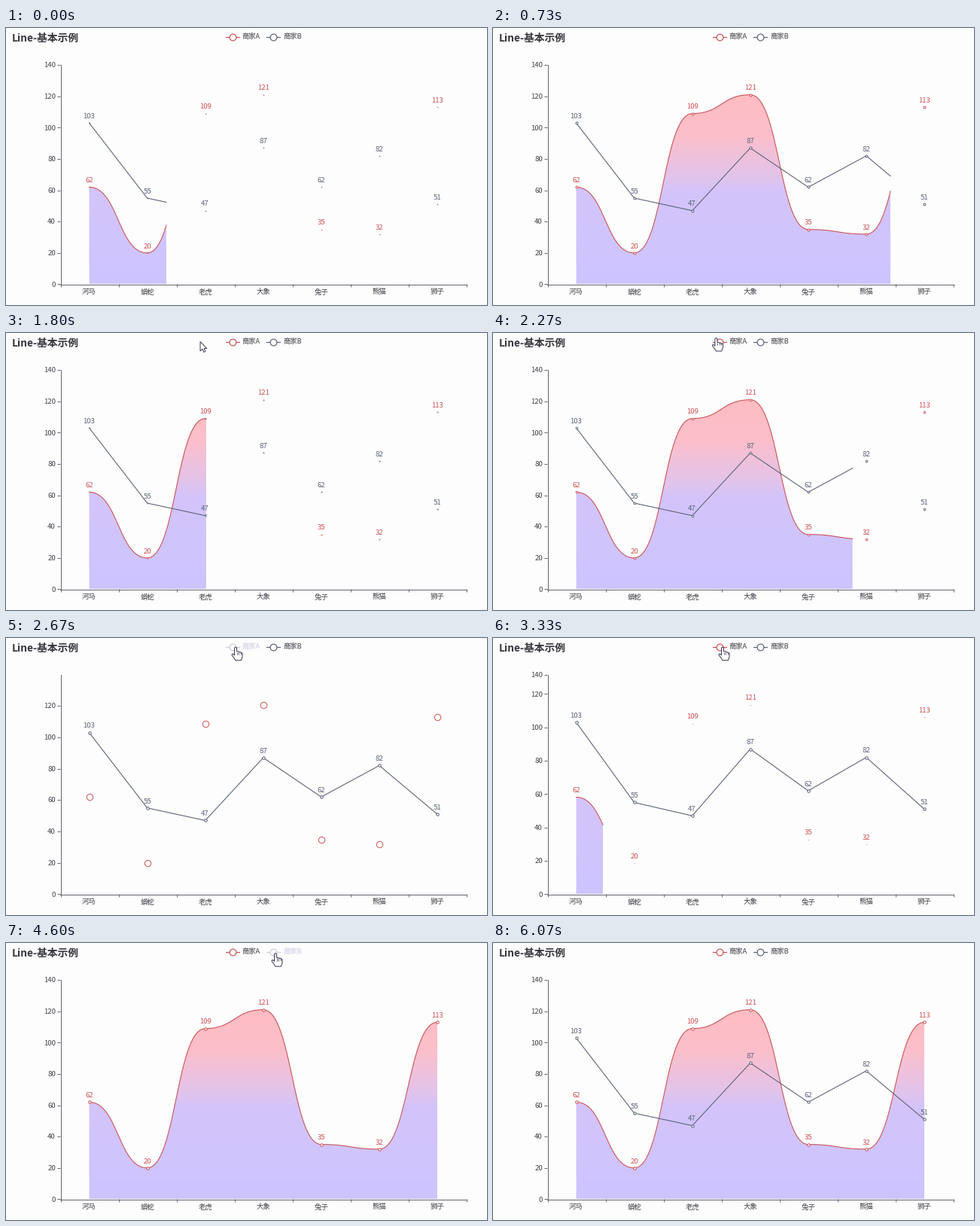
Write a matplotlib script that moves like this. It is 639 by 368 pixels and loops after 6140 ms.

```python
import numpy as np
import matplotlib.pyplot as plt
from matplotlib.animation import FuncAnimation
from matplotlib.collections import LineCollection
from matplotlib.colors import LinearSegmentedColormap
from matplotlib.patches import Polygon
from matplotlib.path import Path

W, H = 639, 368
LOOP, INTERVAL = 6140, 20
POSES = 92  # the picture itself moves at 15 poses a second
FONT = "Noto Sans CJK JP"
LEFT, RIGHT, TOP, BASE = 72, 611.5, 49.2, 340.4
BAND = (RIGHT - LEFT) / 7

RED, SLATE = "#cb5457", "#5d6478"
INK, AXIS, FADED, BG = "#42424a", "#666874", "#cfcbe0", "#fdfdfe"

ANIMALS = ["河马", "蟒蛇", "老虎", "大象", "兔子", "熊猫", "狮子"]
SHOP_A = np.array([62, 20, 109, 121, 35, 32, 113])
SHOP_B = np.array([103, 55, 47, 87, 62, 82, 51])
XS = LEFT + BAND * (np.arange(7) + 0.5)

# Timeline in ms
REVEAL, UPDATE, SHRINK = 2000, 360, 200
FIRST, RESTART = -192, 1526
HIDE_A, SHOW_A = 2668, 3241
HIDE_B, SHOW_B = 4350, 4870
CURSOR_T = [1735, 1800, 2070, 2200, 2340, 3780, 4010, 5480, 6010]
CURSOR_X = [246, 258, 262, 288, 305, 305, 358, 358, 595]
CURSOR_Y = [30, 11.5, 12, 1, 12, 12, 13.5, 13.5, 60]


def ease_out(p):
    return 1 - (1 - np.clip(p, 0, 1)) ** 3


def to_y(values, top=140):
    return BASE - np.asarray(values) * (BASE - TOP) / top


def smooth(xs, ys, n=60):
    """Join the points with S-curves that are level at each point."""
    t = np.linspace(0, 1, n)
    across, along = 1.5 * t * (1 - t) + t ** 3, 3 * t ** 2 - 2 * t ** 3
    px = [x0 + (x1 - x0) * across for x0, x1 in zip(xs, xs[1:])]
    py = [y0 + (y1 - y0) * along for y0, y1 in zip(ys, ys[1:])]
    return np.concatenate(px), np.concatenate(py)


def cut(xs, ys, limit):
    """Keep the part of a curve left of the limit."""
    if limit <= xs[0]:
        return xs[:0], ys[:0]
    if limit >= xs[-1]:
        return xs, ys
    keep = xs < limit
    return np.append(xs[keep], limit), np.append(ys[keep], np.interp(limit, xs, ys))


fig = plt.figure(figsize=(W / 72, H / 72), dpi=72, facecolor=BG)
ax = fig.add_axes([0, 0, 1, 1])
ax.axis("off")


def write(x, y, text, color=INK, size=9.6, ha="center", **kw):
    return ax.text(x, y + 0.37 * size, text, color=color, fontsize=size, ha=ha,
                   va="baseline", family=FONT, **kw)


def move_text(item, y):
    item.set_y(y + 0.37 * item.get_fontsize())


class Series:
    def __init__(self, values, color, z):
        self.line, = ax.plot([], [], color=color, lw=1.1, zorder=z)
        self.dots, = ax.plot([], [], "o", mfc="white", mec=color, zorder=z + 1)
        self.labels = [write(x, 0, str(v), color, zorder=8) for x, v in zip(XS, values)]

    def draw(self, curve, ys, shown, radius, limit):
        self.line.set_data(*cut(*curve, limit))
        self.line.set_visible(shown)
        self.dots.set_data(XS, ys)
        self.dots.set_markersize(2 * radius)
        self.dots.set_markeredgewidth(min(1, 0.4 + 0.4 * radius))
        self.dots.set_visible(radius > 0.05)
        for label, y in zip(self.labels, ys):
            move_text(label, y - 9.8)
            label.set_visible(shown)


class LegendItem:
    def __init__(self, x, name, color):
        self.color = color
        self.bar, = ax.plot([x - 9, x + 9], [11.5, 11.5], lw=1.2, zorder=9)
        self.ring, = ax.plot([x], [11.5], "o", ms=8.8, mfc="white", mew=1.2, zorder=10)
        self.name = write(x + 13, 11, name, size=9.3, ha="left")

    def draw(self, on):
        color = self.color if on else FADED
        self.bar.set_color(color)
        self.ring.set_markeredgecolor(color)
        self.name.set_color(INK if on else FADED)


# Static parts
write(8, 13.2, "Line-基本示例", "#38383f", 13.8, "left", weight="bold")
for x, animal in zip(XS, ANIMALS):
    write(x, 350, animal, size=9.4)
ax.plot([LEFT, RIGHT], [340.5, 340.5], color=AXIS, lw=1, zorder=3)
ax.plot([72.5, 72.5], [TOP, BASE], color=AXIS, lw=1, zorder=3)
edges = LEFT + 0.5 + BAND * np.arange(8)
ax.add_collection(LineCollection([[(x, 340), (x, 344)] for x in edges],
                                 colors=AXIS, lw=1, zorder=3))

# Value axis
STEPS = np.arange(0, 141, 20)
ticks = LineCollection([], colors=AXIS, lw=1, zorder=3)
ax.add_collection(ticks)
step_labels = [write(66, 0, str(v), ha="right") for v in STEPS]

# Area under the first series
tint = LinearSegmentedColormap.from_list("tint", [
    (0, "#ffbcc2"), (0.22, "#fcbfcb"), (0.42, "#e4c3e8"),
    (0.52, "#d3c4fb"), (1, "#cec4fe")])
area = ax.imshow(np.linspace(0, 1, 253)[:, None], cmap=tint, aspect="auto",
                 extent=(0, W, BASE, 88), interpolation="nearest", zorder=1)

shop_a = Series(SHOP_A, RED, 4)
shop_b = Series(SHOP_B, SLATE, 6)
legend_a = LegendItem(300.7, "商家A", RED)
legend_b = LegendItem(355.2, "商家B", SLATE)
YS_A = to_y(SHOP_A)
CURVE_A = smooth(XS, YS_A)

# Cursors, drawn from the hot spot
ARROW = np.array([(0, 0), (0, 12.5), (2.9, 9.8), (4.9, 14), (6.9, 13), (5, 9), (8.8, 9)])
HAND = np.array([(-1.5, 1), (0, 0), (1.5, 1), (1.6, 6), (3.6, 5.8), (4.3, 6.8), (6.3, 6.6),
                 (7, 7.6), (8.6, 7.8), (9.2, 9.2), (9, 13), (7.4, 17.6), (-0.2, 17.6),
                 (-2, 14.5), (-5, 10.6), (-4.6, 9.2), (-3.2, 9.2), (-1.5, 11)])
arrow, hand = [ax.add_patch(Polygon(shape, fc="white", ec="#3f3c58", lw=1, zorder=20))
               for shape in (ARROW, HAND)]
folds = LineCollection([], colors="#3f3c58", lw=0.8, zorder=21)
ax.add_collection(folds)

ax.set_xlim(0, W)
ax.set_ylim(H, 0)


def draw_cursor(t):
    x, y = (np.interp(t, CURSOR_T, c) for c in (CURSOR_X, CURSOR_Y))
    present = CURSOR_T[0] <= t <= CURSOR_T[-1]
    on_legend = 290 < x < 393 and 4 < y < 18
    arrow.set_xy(ARROW + (x, y))
    hand.set_xy(HAND + (x, y))
    folds.set_segments([[(x + dx, y + 6.8), (x + dx, y + 10)] for dx in (1.6, 4.2, 6.8)])
    arrow.set_visible(present and not on_legend)
    for part in (hand, folds):
        part.set_visible(present and on_legend)


def progress(t, shown_at, done_at, done_until):
    """Share of a series that is revealed."""
    if done_at <= t < done_until:
        return 1
    start = max(s for s in (FIRST, RESTART, shown_at) if s <= t)
    return ease_out((t - start) / REVEAL)


def dot_radius(t, share, hover, hide, show):
    if hide <= t < show:
        return 4.3 * (1 - ease_out((t - hide) / SHRINK))
    normal = 1.75 * share
    if hover <= t < hide:
        return normal + (4.3 - normal) * ease_out((t - hover) / 200)
    return normal


def draw(frame):
    pose = (frame + 1) * INTERVAL * POSES // LOOP % POSES
    t = pose * LOOP / POSES
    on_a = not HIDE_A <= t < SHOW_A
    on_b = not HIDE_B <= t < SHOW_B

    # The value axis rescales while the first series is hidden
    since = SHOW_A if t >= SHOW_A else HIDE_A
    k = ease_out((t - since) / UPDATE)
    k = 1 - k if t >= SHOW_A else k
    step_ys = (1 - k) * to_y(STEPS) + k * to_y(STEPS, 120)
    step_ys[-1] = TOP
    count = len(STEPS) if on_a else len(STEPS) - 1
    ticks.set_segments([[(68, y), (72, y)] for y in step_ys[:count]])
    for i, label in enumerate(step_labels):
        move_text(label, step_ys[i] - 0.4)
        label.set_visible(i < count)

    share = progress(t, SHOW_A, HIDE_B, LOOP)
    limit = LEFT + (RIGHT - LEFT) * share
    shop_a.draw(CURVE_A, YS_A, on_a, dot_radius(t, share, 2330, HIDE_A, SHOW_A), limit)
    px, py = cut(*CURVE_A, limit)
    area.set_visible(on_a and len(px) > 1)
    if len(px) > 1:
        outline = np.column_stack([np.r_[px, px[-1], px[0]], np.r_[py, BASE, BASE]])
        area.set_clip_path(Path(outline), ax.transData)

    share = progress(t, SHOW_B, HIDE_A, SHOW_B)
    limit = LEFT + (RIGHT - LEFT) * share
    ys = (1 - k) * to_y(SHOP_B) + k * to_y(SHOP_B, 120)
    shop_b.draw((XS, ys), ys, on_b, dot_radius(t, share, 4000, HIDE_B, SHOW_B), limit)

    legend_a.draw(on_a)
    legend_b.draw(on_b)
    draw_cursor(t)
    return []


anim = FuncAnimation(fig, draw, frames=LOOP // INTERVAL, init_func=lambda: draw(0),
                     interval=INTERVAL, repeat=True, repeat_delay=0, blit=False)
plt.show()
```
